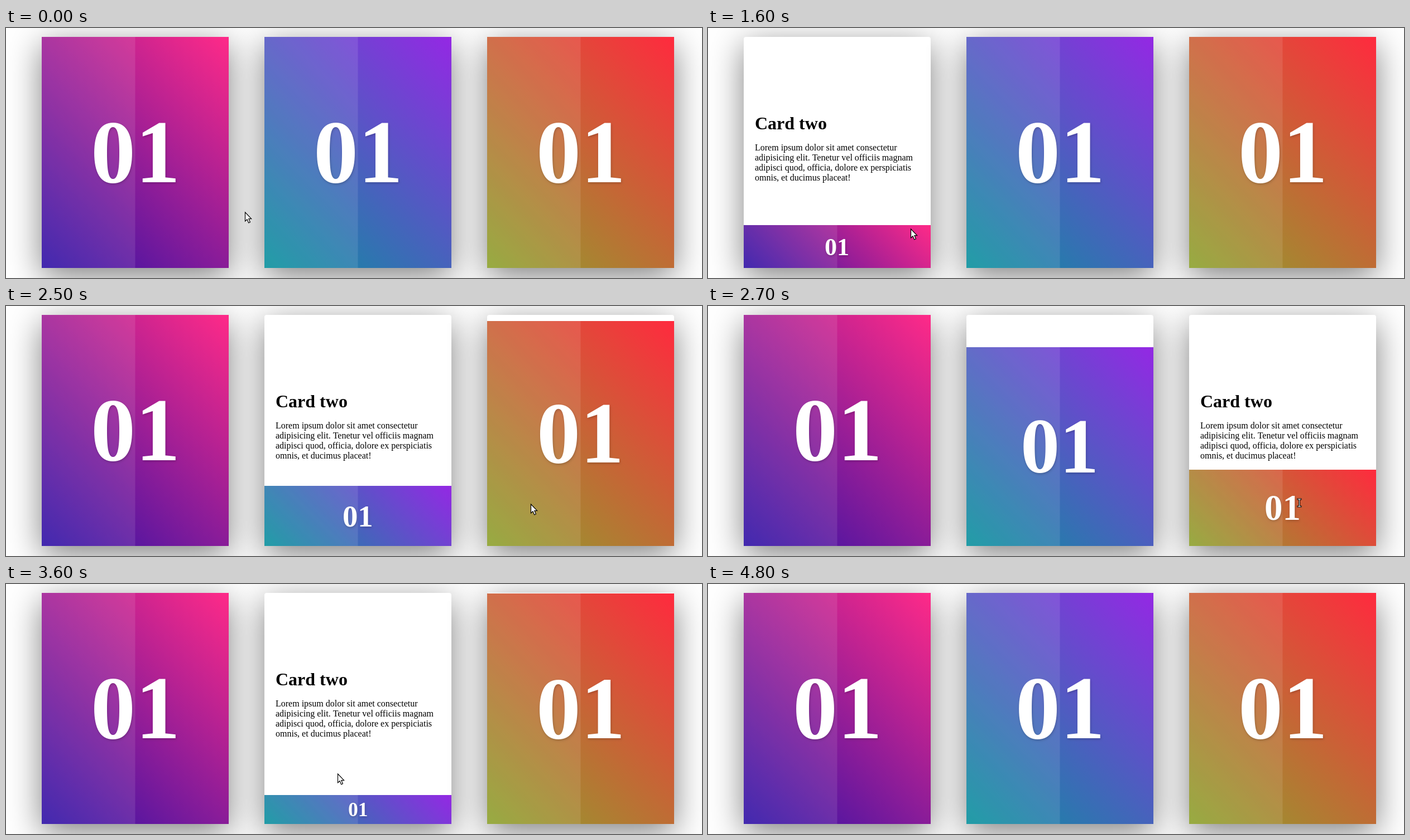
An HTML page with a canvas that plays this animation: 1247x449 px, repeating every 5.4 s.

```html
<!DOCTYPE html>
<html lang="en">
<head>
<meta charset="utf-8">
<title>Hover cards</title>
<style>
html, body { margin: 0; width: 100%; height: 100%; overflow: hidden; background: #fff; }
canvas { display: block; }
</style>
</head>
<body>
<canvas id="stage" width="1247" height="449"></canvas>
<script>
const ctx = document.getElementById('stage').getContext('2d');
const LOOP = 5400;
const FADE = 500;
const CARD = { x: 64, y: 16, w: 335, h: 415, pitch: 399, folded: 0.1 };
const SERIF = '"Liberation Serif", "Times New Roman", serif';
const COPY = [
  'Lorem ipsum dolor sit amet consectetur',
  'adipisicing elit. Tenetur vel officiis magnam',
  'adipisci quod, officia, dolore ex perspiciatis',
  'omnis, et ducimus placeat!'
];

const cards = [
  { from: 'rgb(44,17,166)', to: 'rgb(255,42,136)',
    visits: [{ enter: 697, leave: 1580 }] },
  { from: 'rgb(8,146,156)', to: 'rgb(148,40,228)',
    visits: [{ enter: 1667, leave: 2547 }, { enter: 3327, leave: 4400 }] },
  { from: 'rgb(139,162,45)', to: 'rgb(255,42,62)',
    visits: [{ enter: 2597, leave: 3257 }] }
];
cards.forEach((card, i) => { card.x = CARD.x + CARD.pitch * i; });

// The pointer rests between glides and leaves the stage after the last one.
const home = { x: 428, y: 330 };
const glides = [
  { start: 100, end: 200, x: 428, y: 333 },
  { start: 500, end: 800, x: 363, y: 346 },
  { start: 1300, end: 1600, x: 363, y: 360 },
  { start: 1600, end: 1900, x: 600, y: 360 },
  { start: 2100, end: 2700, x: 1059, y: 353 },
  { start: 2700, end: 3600, x: 594, y: 340 },
  { start: 4100, end: 4300, x: 452, y: 380 }
];

const clamp = (v, lo, hi) => Math.min(hi, Math.max(lo, v));
const mix = (a, b, k) => a + (b - a) * k;
const smooth = k => k * k * (3 - 2 * k);

// CSS "ease": cubic-bezier(.25, .1, .25, 1)
function ease(x) {
  if (x <= 0) return 0;
  if (x >= 1) return 1;
  let lo = 0, hi = 1;
  for (let i = 0; i < 24; i++) {
    const s = (lo + hi) / 2;
    if (0.75 * s - 0.75 * s * s + s ** 3 < x) lo = s; else hi = s;
  }
  return 0.3 * lo * (1 - lo) ** 2 + 3 * lo * lo * (1 - lo) + lo ** 3;
}

// The picture advances in tenths of a second, with two longer rests.
function stepTime(ms) {
  const t = Math.floor((ms % LOOP) / 100) * 100;
  if (t > 1100 && t < 1400) return 1100;
  if (t > 3600 && t < 4000) return 3600;
  return t;
}

// Card transitions run on a clock that hurries through the first handover.
const cardClock = t => t + 0.3 * clamp(t - 1500, 0, 400);

function collapse(card, t) {
  const now = cardClock(t);
  return card.visits.reduce((sum, { enter, leave }) =>
    sum + ease((now - enter) / FADE) - ease((now - leave) / FADE), 0);
}

function layout(card, t) {
  const c = collapse(card, t);
  const h = Math.round(CARD.h * mix(1, CARD.folded, c));
  const top = CARD.y + CARD.h - h;
  return { h, top, cx: card.x + CARD.w / 2, cy: top + h / 2, size: mix(160, 32, c) };
}

function withShadow(color, dx, dy, blur, draw) {
  ctx.save();
  ctx.shadowColor = color;
  ctx.shadowOffsetX = dx;
  ctx.shadowOffsetY = dy;
  ctx.shadowBlur = blur;
  draw();
  ctx.restore();
}

function drawCopy(x) {
  ctx.fillStyle = '#000';
  ctx.font = `bold 32px ${SERIF}`;
  ctx.fillText('Card two', x, 182);
  ctx.font = `16px ${SERIF}`;
  COPY.forEach((line, i) => ctx.fillText(line, x, 220 + 18 * i));
}

function drawFace(card, t) {
  const { h, top, cx, cy, size } = layout(card, t);
  const r = (CARD.w + h) / 4; // reach of a 45deg CSS gradient
  const fill = ctx.createLinearGradient(cx - r, cy + r, cx + r, cy - r);
  fill.addColorStop(0, card.from);
  fill.addColorStop(1, card.to);
  ctx.fillStyle = fill;
  ctx.fillRect(card.x, top, CARD.w, h);
  ctx.fillStyle = 'rgba(255,255,255,.1)';
  ctx.fillRect(card.x, top, CARD.w / 2, h);

  withShadow('rgba(0,0,0,.2)', 1, 2, 4, () => {
    ctx.fillStyle = '#fff';
    ctx.font = `bold ${size}px ${SERIF}`;
    ctx.fillText('01', Math.round(cx - size / 2), Math.ceil(cy + size * 0.331));
  });
}

function drawCard(card, t) {
  withShadow('rgba(0,0,0,.5)', 0, 15, 60, () => {
    ctx.fillStyle = '#fff';
    ctx.beginPath();
    ctx.roundRect(card.x, CARD.y, CARD.w, CARD.h, 4);
    ctx.fill();
  });
  drawCopy(card.x + 20);
  drawFace(card, t);
}

function pointerAt(t) {
  let { x, y } = home;
  for (const g of glides) {
    const k = smooth(clamp((t - g.start) / (g.end - g.start), 0, 1));
    x = mix(x, g.x, k);
    y = mix(y, g.y, k);
  }
  return { x: Math.round(x), y: Math.round(y) };
}

function overDigits(p, t) {
  return cards.some(card => {
    const { cx, cy, size } = layout(card, t);
    return Math.abs(p.x - cx) < size / 2 && Math.abs(p.y - cy) < size * 0.55;
  });
}

function drawArrow() {
  const shape = new Path2D('M.5 1V17L4 13.8 6.7 20 9.4 18.8 6.9 12.7H11.6Z');
  ctx.fillStyle = '#fff';
  ctx.fill(shape);
  ctx.lineWidth = 1.2;
  ctx.strokeStyle = '#000';
  ctx.stroke(shape);
}

function drawBeam() {
  const shape = new Path2D('M-2 -6H3M.5 -6V7M-2 7H3');
  ctx.lineCap = 'square';
  for (const [color, width] of [['#000', 3], ['#fff', 1]]) {
    ctx.strokeStyle = color;
    ctx.lineWidth = width;
    ctx.stroke(shape);
  }
}

function drawPointer(t) {
  if (t > glides.at(-1).end) return;
  const p = pointerAt(t);
  ctx.save();
  ctx.translate(p.x, p.y);
  if (overDigits(p, t)) drawBeam(); else drawArrow();
  ctx.restore();
}

function render(ms) {
  const t = stepTime(ms);
  ctx.fillStyle = '#fff';
  ctx.fillRect(0, 0, 1247, 449);
  cards.forEach(card => drawCard(card, t));
  drawPointer(t);
}

let origin;
function frame(now) {
  origin ??= now;
  render(now - origin);
  requestAnimationFrame(frame);
}
requestAnimationFrame(frame);
</script>
</body>
</html>
```
